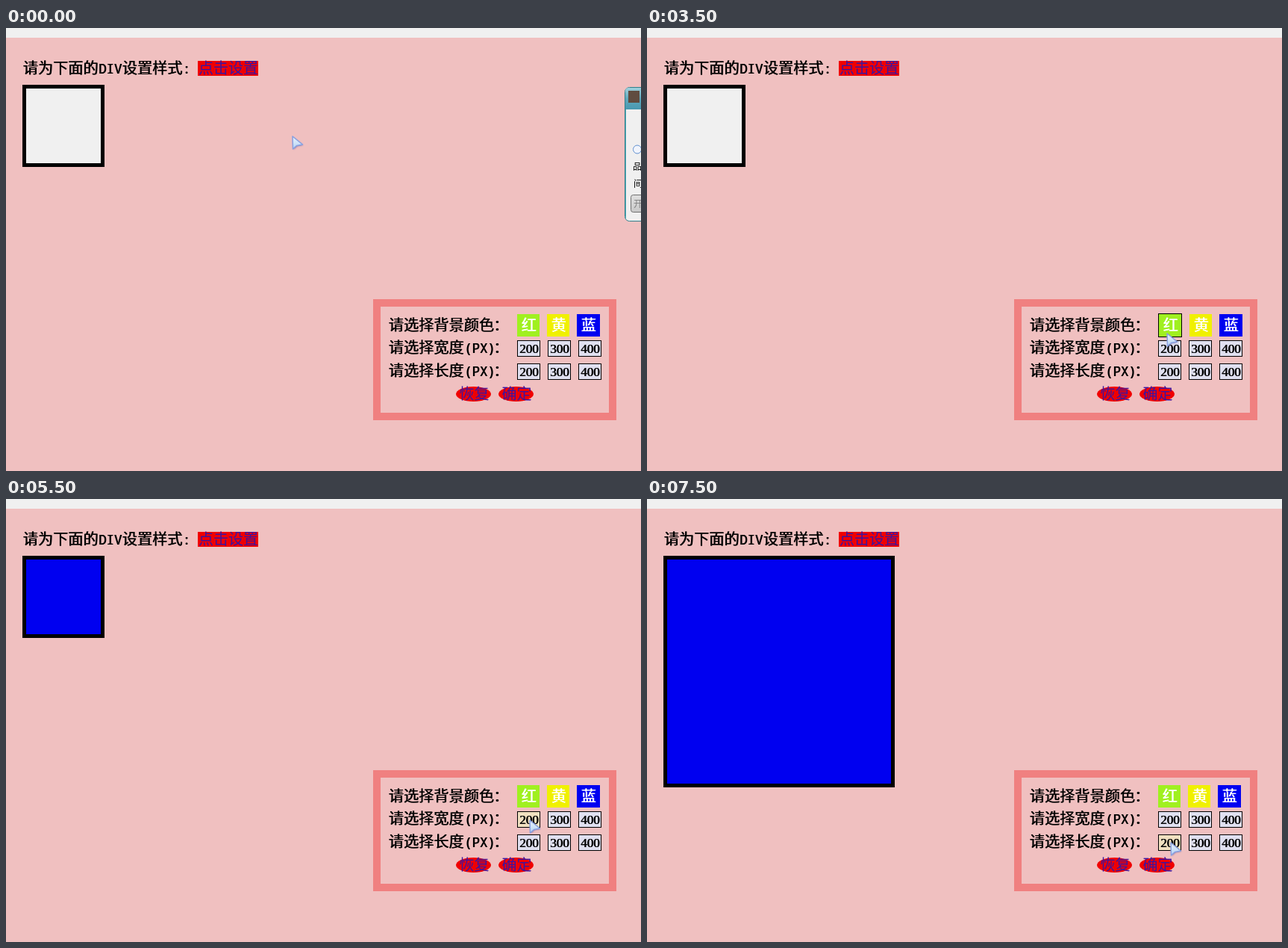
Recreate the animation shown at these times as an HTML page with a canvas. Size 851x593 px, loop 8 s.

```html
<!DOCTYPE html>
<html lang="zh-CN">
<head>
<meta charset="utf-8">
<style>
html, body { margin: 0; width: 100%; height: 100%; overflow: hidden; background: #f0c0c0; }
canvas { display: block; }
</style>
</head>
<body>
<canvas id="stage" width="851" height="593"></canvas>
<script>
const ctx = document.getElementById('stage').getContext('2d');
const STEP = 500, LOOP = 8000;
const CJK = '"Noto Sans CJK SC", "Noto Sans CJK", sans-serif';
const MONO = '"Noto Sans Mono", monospace';
const SERIF = '"Liberation Serif", serif';
const RED = '#f00000', YELLOW = '#f0f000', BLUE = '#0000f0', GREY = '#f0f0f0';
const COLUMNS = [685, 726, 767];
const ROWS = { width: 418, height: 449 };

// Each state holds until the next one starts; unnamed properties carry over.
const timeline = [
  { at: 0, cursor: [382, 143], fill: GREY, w: 100, h: 100, hover: '', sideWindow: true },
  { at: 500, cursor: [236, 110] },
  { at: 1000, cursor: [303, 69] },
  { at: 2000, cursor: [297, 52] },
  { at: 2500, sideWindow: false },
  { at: 3000, cursor: [619, 340] },
  { at: 3500, cursor: [695, 407], hover: 'color0' },
  { at: 4000, cursor: [698, 417], fill: RED },
  { at: 4500, cursor: [733, 401], hover: 'color1' },
  { at: 5000, cursor: [776, 399], fill: YELLOW, hover: 'color2' },
  { at: 5500, cursor: [700, 428], fill: BLUE, hover: 'width0' },
  { at: 6000, cursor: [735, 428], w: 200, hover: 'width1' },
  { at: 6500, cursor: [776, 427], w: 300, hover: 'width2' },
  { at: 7000, cursor: [732, 453], hover: 'height1' },
  { at: 7500, cursor: [700, 458], h: 300, hover: 'height0' }
];

function stateAt(time) {
  return Object.assign({}, ...timeline.filter(s => s.at <= time));
}

function rect(x, y, w, h, color) {
  ctx.fillStyle = color;
  ctx.fillRect(x, y, w, h);
}

function framed(x, y, w, h, border, edge, fill) {
  rect(x, y, w, h, edge);
  rect(x + border, y + border, w - 2 * border, h - 2 * border, fill);
}

function text(str, x, y, font, color = '#000') {
  ctx.font = font;
  ctx.fillStyle = color;
  ctx.fillText(str, x, y);
}

// Thickens upright strokes only, like a screen font's simulated bold.
function boldText(str, x, y, font, color) {
  text(str, x, y, font, color);
  text(str, x + 0.7, y, font, color);
}

const label = (str, x, y) => boldText(str, x, y, '20.2px ' + CJK);
const latin = (str, x, y) => boldText(str, x, y, '17.3px ' + MONO);
const linkText = (str, x, y) => text(str, x, y, '20px ' + CJK, '#3c14a0');

function vertical(y0, y1, ...colors) {
  const g = ctx.createLinearGradient(0, y0, 0, y1);
  colors.forEach((c, i) => g.addColorStop(i / (colors.length - 1), c));
  return g;
}

function rounded(x, y, w, h, r, fill, edge) {
  ctx.beginPath();
  ctx.roundRect(x, y, w, h, r);
  ctx.fillStyle = fill;
  ctx.fill();
  ctx.strokeStyle = edge;
  ctx.lineWidth = 1;
  ctx.stroke();
}

function drawSideWindow() {
  rounded(829.5, 79.5, 60, 179, 6, GREY, '#30808c');
  ctx.save();
  ctx.clip();
  rect(830, 80, 21, 29, vertical(80, 109, '#a0d0dc', '#60a8bc', '#4898b0'));
  rect(830, 109, 1, 149, '#50a8b4');
  ctx.restore();
  rect(834, 84, 15, 16, '#604c40');
  ctx.beginPath();
  ctx.arc(846, 162.5, 5.5, 0, Math.PI * 2);
  ctx.fillStyle = '#f0f4fc';
  ctx.fill();
  ctx.strokeStyle = '#6090d0';
  ctx.stroke();
  text('品', 840, 190, '12px ' + CJK);
  text('间', 841, 213, '12px ' + CJK);
  rounded(837.5, 223.5, 40, 23, 3, vertical(223, 247, '#e0e0e0', '#c8c8c8'), '#707070');
  text('开', 841, 240, '12px ' + CJK, '#808080');
}

function drawHeading(s) {
  label('请为下面的', 22.5, 61);
  latin('DIV', 124, 61);
  label('设置样式', 155.5, 61);
  latin(':', 236.5, 61);
  rect(257, 44, 81, 20, RED);
  linkText('点击设置', 258, 61);
  framed(22, 76, s.w + 10, s.h + 10, 5, '#000', s.fill);
}

function drawColors(hover) {
  const swatches = [['红', '#a0f020'], ['黄', YELLOW], ['蓝', BLUE]];
  let x = 685;
  swatches.forEach(([name, color], i) => {
    const on = hover === 'color' + i;
    const w = i === 2 ? 31 : 30;
    if (on) framed(x, 382, w + 2, 32, 1, '#000', color);
    else rect(x, 383, w, 30, color);
    boldText(name, x + 5.5 + on, 405, '20px ' + CJK, '#fff');
    x += 40 + (on ? 2 : 0);
  });
}

function drawSizes(hover) {
  for (const [row, y] of Object.entries(ROWS)) {
    COLUMNS.forEach((x, i) => {
      const on = hover === row + i;
      framed(x, y, 31, 22, 1, '#000', on ? '#f0e0c0' : '#e0e0f0');
      boldText(200 + 100 * i, x + 3, y + 17, '17px ' + SERIF);
    });
  }
}

function pill(str, x) {
  ctx.beginPath();
  ctx.ellipse(x + 23.5, 490, 23.5, 10, 0, 0, Math.PI * 2);
  ctx.fillStyle = RED;
  ctx.fill();
  linkText(str, x + 4.5, 497);
}

function drawPanel(hover) {
  framed(492, 363, 326, 162, 10, '#f08080', '#f0c0c0');
  label('请选择背景颜色', 512.5, 405);
  [['宽度', 435], ['长度', 466]].forEach(([name, y]) => {
    label('请选择' + name, 512.5, y);
    latin('(PX)', 614, y);
  });
  [405, 435, 466].forEach(y => label('：', 653, y));
  drawColors(hover);
  drawSizes(hover);
  pill('恢复', 603);
  pill('确定', 660);
}

function drawCursor([x, y]) {
  ctx.save();
  ctx.translate(x, y);
  ctx.beginPath();
  ctx.moveTo(2, 2);
  ctx.lineTo(2.5, 19);
  ctx.lineTo(7.5, 14.5);
  ctx.lineTo(15.5, 13);
  ctx.closePath();
  ctx.shadowColor = 'rgba(70, 70, 150, .5)';
  ctx.shadowBlur = 2;
  ctx.shadowOffsetX = ctx.shadowOffsetY = 1;
  ctx.fillStyle = vertical(2, 19, '#e8f0fc', '#d0e4f8', '#b0d0f4');
  ctx.fill();
  ctx.shadowColor = 'transparent';
  ctx.strokeStyle = '#88a0e0';
  ctx.lineWidth = 1.5;
  ctx.lineJoin = 'round';
  ctx.stroke();
  ctx.restore();
}

function draw(time) {
  const s = stateAt(time);
  rect(0, 0, 851, 593, '#f0c0c0');
  rect(0, 0, 851, 13, GREY);
  drawHeading(s);
  if (s.sideWindow) drawSideWindow();
  drawPanel(s.hover);
  drawCursor(s.cursor);
}

const start = performance.now();
function tick() {
  const elapsed = (performance.now() - start) % LOOP;
  draw(Math.floor(elapsed / STEP) * STEP);
  requestAnimationFrame(tick);
}
tick();
</script>
</body>
</html>
```
